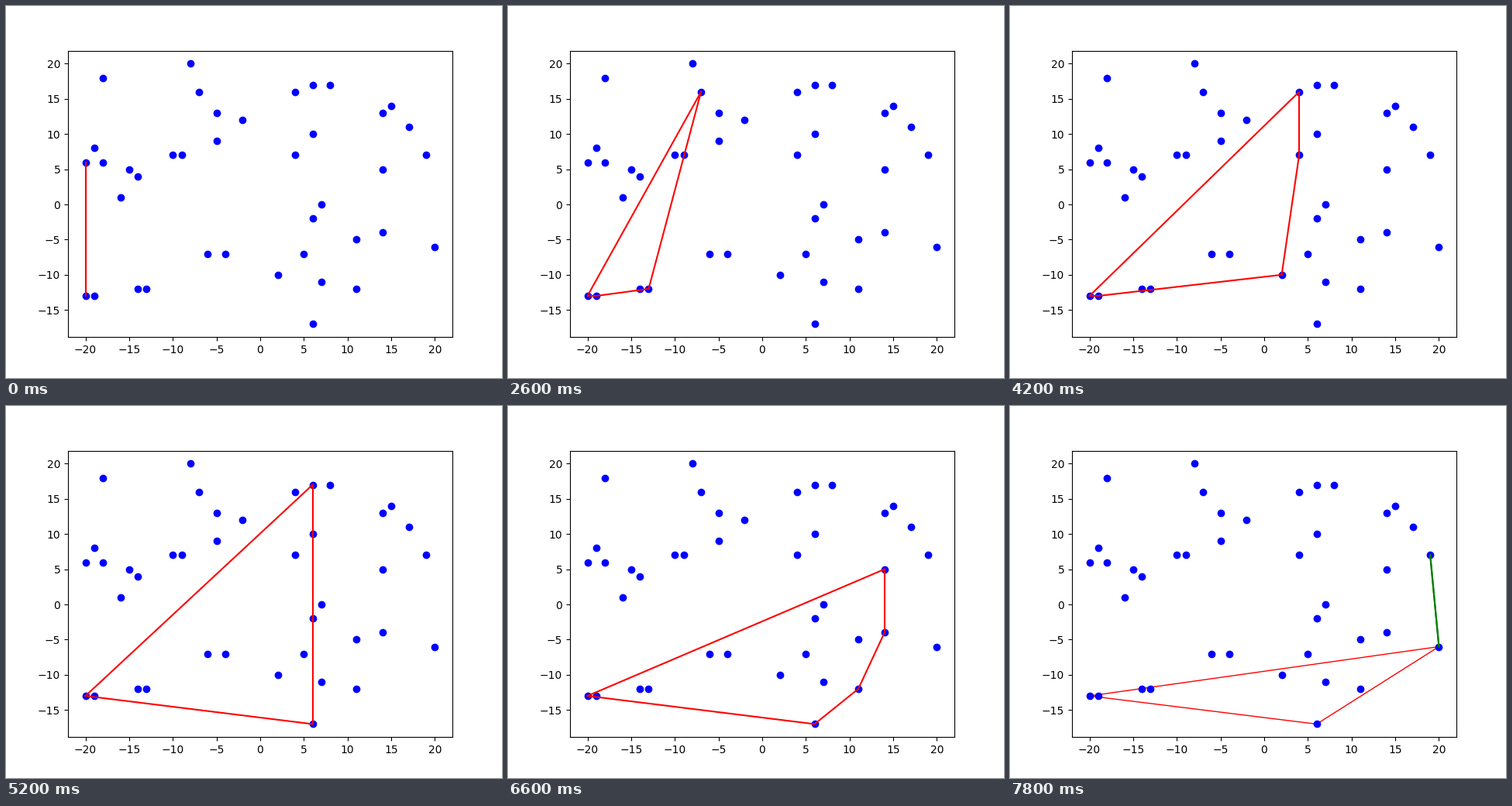
These frames come from a looping animation (640x480 px, 8000 ms). A matplotlib script:

```python
import matplotlib.pyplot as plt
from matplotlib.animation import FuncAnimation
from matplotlib.patches import Polygon

# Monotone chain convex hull, one point added per frame.
# Scatter by column: x -> heights of its points.
COLUMNS = {
    -20: (-13, 6), -19: (-13, 8), -18: (6, 18), -16: (1,), -15: (5,),
    -14: (-12, 4), -13: (-12,), -10: (7,), -9: (7,), -8: (20,),
    -7: (16,), -6: (-7,), -5: (9, 13), -4: (-7,), -2: (12,), 2: (-10,),
    4: (7, 16), 5: (-7,), 6: (-17, -2, 10, 17), 7: (-11, 0), 8: (17,),
    11: (-12, -5), 14: (-4, 5, 13), 15: (14,), 17: (11,), 19: (7,),
    20: (-6,),
}
POINTS = [(x, y) for x, ys in COLUMNS.items() for y in ys]
LOWER_STEPS = len(POINTS) - 1
FRAMES = LOWER_STEPS + 1


def cross(o, a, b):
    return (a[0] - o[0]) * (b[1] - o[1]) - (a[1] - o[1]) * (b[0] - o[0])


def half_hull(points):
    hull = []
    for p in points:
        while len(hull) > 1 and cross(hull[-2], hull[-1], p) <= 0:
            hull.pop()
        hull.append(p)
    return hull


fig, ax = plt.subplots(figsize=(6.4, 4.8), dpi=100)
ax.plot(*zip(*POINTS), "bo")
ax.set_xlim(-22, 22)
ax.set_ylim(-18.85, 21.85)
lower = ax.add_patch(Polygon(half_hull(POINTS), fill=False, edgecolor="r",
                             linewidth=1, visible=False))
edges = []


def draw_edges(hull, color):
    """Draw each side of the closed hull as its own line."""
    while edges:
        edges.pop().remove()
    for a, b in zip(hull, hull[1:] + hull[:1]):
        edges.extend(ax.plot(*zip(a, b), color=color))


def update(frame):
    step = frame - LOWER_STEPS
    lower.set_visible(step >= 0)
    if step < 0:
        draw_edges(half_hull(POINTS[:frame + 2]), "r")
    else:
        draw_edges(half_hull(POINTS[::-1][:step + 2]), "g")
    return [lower, *edges]


anim = FuncAnimation(fig, update, frames=FRAMES, interval=200,
                     repeat=True, repeat_delay=0)
plt.show()
```
